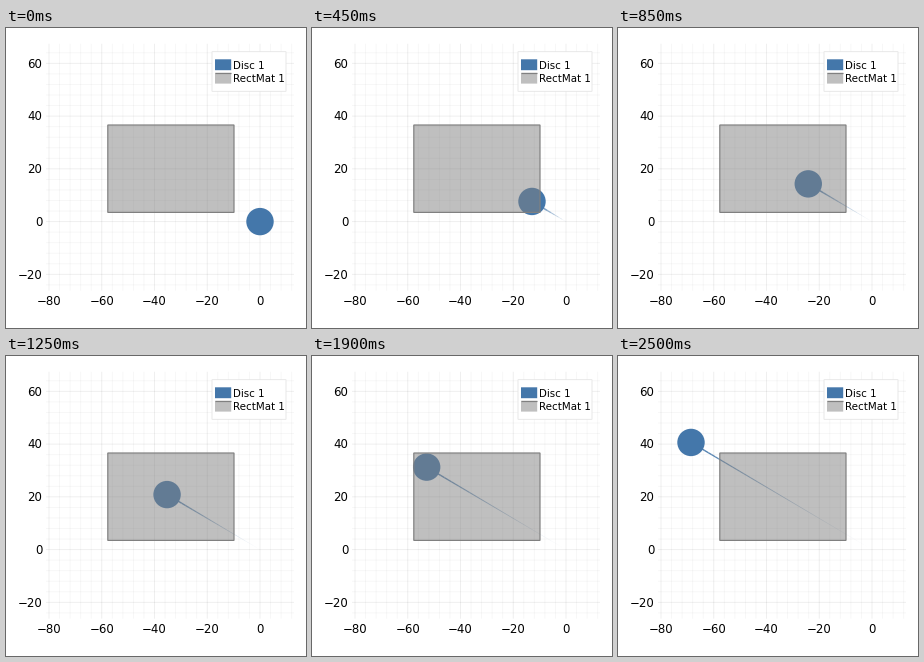
A matplotlib script that plays this animation: 300x300 px, repeating every 2.55 s.

```python
import numpy as np
import matplotlib.pyplot as plt
from matplotlib.animation import FuncAnimation
from matplotlib.collections import LineCollection
from matplotlib.colors import to_rgb
from matplotlib.patches import Circle, Rectangle

SIZE, DPI = 300, 100
FRAMES, INTERVAL = 51, 50
PT = 72 / DPI                      # points per pixel
SCALE = 2.6375                     # pixels per data unit
X0, Y0 = 254.0, 193.6              # pixel position of the data origin
LEFT, RIGHT, TOP, BOTTOM = 40.5, 287.5, 16.2, 262.2
RADIUS = 13.7
BLUE, GREY = "#4477AA", "#808080"

plt.rcParams["font.family"] = "DejaVu Sans"
fig = plt.figure(figsize=(SIZE / DPI, SIZE / DPI), dpi=DPI, facecolor="white")
ax = fig.add_axes([0, 0, 1, 1])
ax.set_xlim(0, SIZE)
ax.set_ylim(SIZE, 0)
ax.axis("off")


def px(x):
    return X0 + SCALE * x


def py(y):
    return Y0 - SCALE * y


def grid_line(xs, ys, major):
    ax.plot(xs, ys, color="black", alpha=0.07 if major else 0.035,
            lw=0.9 * PT, snap=False, zorder=1)


def box(x0, y0, x1, y1, zorder, **style):
    ax.add_patch(Rectangle((x0, y0), x1 - x0, y1 - y0, snap=False,
                           zorder=zorder, **style))


def draw_grid():
    for v in range(-80, 69, 4):
        major = v % 20 == 0
        if LEFT <= px(v) <= RIGHT:
            grid_line([px(v)] * 2, [TOP, BOTTOM], major)
        if TOP <= py(v) <= BOTTOM:
            grid_line([LEFT, RIGHT], [py(v)] * 2, major)
    size = 11.8 * PT
    for v in range(-80, 1, 20):
        ax.text(px(v), 277.3, str(v).replace("-", "\u2212"), fontsize=size,
                ha="center", va="baseline")
    for v in range(-20, 61, 20):
        ax.text(36.2, py(v) + 4.3, str(v).replace("-", "\u2212"),
                fontsize=size, ha="right", va="baseline")


def draw_legend():
    box(206, 23.7, 280, 63.3, 6, fc="white", ec="#e3e3e3", lw=0.8 * PT)
    box(209, 31.3, 225.2, 42.2, 7, fc=BLUE, lw=0)
    box(209, 44.8, 225.2, 55.6, 7, fc="#bfbfbf", lw=0)
    ax.plot([209, 225.2], [45, 45], color=GREY, lw=1.2 * PT, zorder=8,
            solid_capstyle="butt")
    for y, label in ((41, "Disc 1"), (54.3, "RectMat 1")):
        ax.text(226.6, y, label, fontsize=10.2 * PT, va="baseline", zorder=8)


def position(n):
    """Disc centre after n steps, slowing slightly under friction."""
    d = 3.815 * n - 0.0039 * n * n
    return X0 - d, Y0 - 0.592 * d


draw_grid()
draw_legend()

trail = LineCollection([], zorder=2, capstyle="butt")
ax.add_collection(trail, autolim=False)
disc = Circle((X0, Y0), RADIUS, fc=BLUE, lw=0, zorder=3)
ax.add_patch(disc)

mat = (101.8, 97.0, 228.0, 184.4)
box(*mat, 4, fc=GREY, alpha=0.5, lw=0)
box(*mat, 5, fill=False, ec=GREY, lw=1.2 * PT)


def update(n):
    disc.center = position(n)
    if n == 0:
        trail.set_segments([])
        return trail, disc
    path = np.column_stack(position(np.arange(n + 1)))
    fade = np.arange(1, n + 1) / n
    trail.set_segments(np.stack([path[:-1], path[1:]], axis=1))
    trail.set_linewidths(fade * (1.3 + 9 / n) * PT)
    trail.set_color([(*to_rgb(BLUE), a) for a in fade])
    return trail, disc


anim = FuncAnimation(fig, update, frames=FRAMES, interval=INTERVAL,
                     repeat=True, repeat_delay=0)
plt.show()
```
